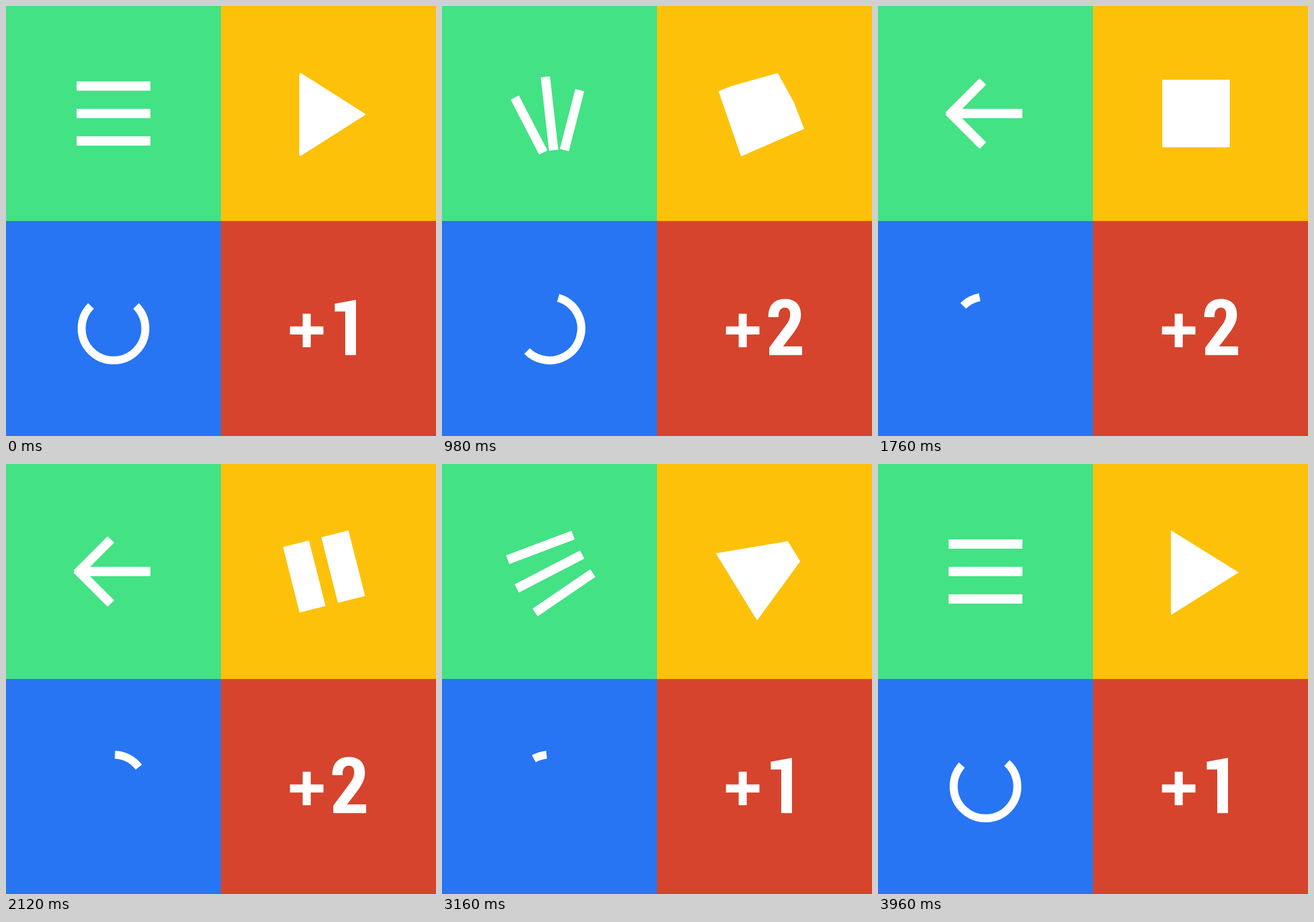
An HTML page with a canvas that plays this animation: 720x720 px, repeating every 3.98 s.

```html
<!DOCTYPE html>
<html lang="en">
<head>
<meta charset="utf-8">
<title>Four morphing icons</title>
<style>
html, body { margin: 0; width: 100%; height: 100%; overflow: hidden; }
canvas { display: block; width: 100vmin; height: 100vmin; }
</style>
</head>
<body>
<canvas id="stage" width="720" height="720"></canvas>
<script>
const ctx = document.getElementById('stage').getContext('2d');
const LOOP = 3980, TICK = 20, FPS = 30;
const GREEN = '#43e284', YELLOW = '#fdc109', BLUE = '#2775f3', RED = '#d6442d';
const rad = deg => deg * Math.PI / 180;
const clamp = x => Math.min(1, Math.max(0, x));
const mix = (a, b, p) => a + (b - a) * p;

// cubic-bezier(x1, 0, x2, 1)
function bezier(x1, x2, x) {
  if (x <= 0) return 0;
  if (x >= 1) return 1;
  let lo = 0, hi = 1;
  for (let i = 0; i < 24; i++) {
    const s = (lo + hi) / 2, r = 1 - s;
    if (3 * x1 * s * r * r + 3 * x2 * s * s * r + s ** 3 < x) lo = s; else hi = s;
  }
  return lo * lo * (3 - 2 * lo);
}
const turn = (k, start) => bezier(0.4, 0, (k - start) / 34);
const snap = (k, start) => bezier(0.333, 0, (k - start) / 24);
const spin = (k, start) => bezier(0.43, 0.1, (k - start) / 20);

// Runs draw with the origin at x, y, turned by deg
function at(x, y, deg, draw) {
  ctx.save();
  ctx.translate(x, y);
  ctx.rotate(rad(deg));
  draw();
  ctx.restore();
}

function polygon(points) {
  ctx.beginPath();
  points.forEach(([x, y]) => ctx.lineTo(x, y));
  ctx.closePath();
}

function morph(from, to, p) {
  polygon(from.map(([x, y], i) => [mix(x, to[i][0], p), mix(y, to[i][1], p)]));
  ctx.fill();
}

function bar(w, h) {
  ctx.fillRect(-w / 2, -h / 2, w, h);
}

function drawMenu(k) {
  const out = turn(k, 20), back = turn(k, 78.6), arrow = out - back;
  at(180, 180, 180 * (out + back), () => {
    bar(123.5, 15.5);
    for (const side of [-1, 1]) {
      at(33 * arrow, side * (46 - 21 * arrow), -side * 45 * arrow,
        () => bar(123.5 - 42.5 * arrow, 15.5));
    }
  });
}

const TRIANGLE = [[70.5, 1.5], [-39, 71], [-41.5, 70], [-41.5, 0], [-41.5, -66], [-39, -68]];
const DIAMOND = [[80, 0], [0, 80], [-20, 60], [-80, 0], [-40, -40], [0, -80]];
const SQUARE = [[-56.5, -56.5], [56.5, -56.5], [56.5, 56.5], [-56.5, 56.5]];
const PLAY = [[-42, -69], [71.5, 1.5], [71.5, 1.5], [-42, 73]];

function drawPlayer(k) {
  const stop = snap(k, 17.8), pause = snap(k, 52.8), play = snap(k, 87.5);
  const turned = play ? play : pause;
  const angle = pause ? 90 * (turned - 1) : 135 * stop;
  at(532.5, 180, angle, () => {
    if (!pause) return morph(TRIANGLE, DIAMOND, stop);
    morph(SQUARE, PLAY, play);
    const gap = play ? clamp(1 - play / 0.6) : clamp((pause - 0.4) / 0.6);
    if (!gap) return;
    if (play) ctx.rotate(Math.PI / 2);
    ctx.fillStyle = YELLOW;
    ctx.fillRect(-1 - 14.5 * gap, -100, 29 * gap, 200);
  });
}

function drawSpinner(k) {
  const c = k % 40, drift = 2.65 * c;
  const tail = 45 + drift + 254 * spin(c, 0);
  const head = 315 + drift + 254 * spin(c, 20);
  ctx.lineWidth = 13.4;
  ctx.beginPath();
  ctx.arc(180, 540, 53.3, rad(tail - 90), rad(head - 90));
  ctx.stroke();
}

const ONE = new Path2D('M550.5 498.5L586 492V584.5H568V511.5H550.5Z');
const TWO = new Path2D('M546.5 521C546 502 556 490.5 574 490.5C592 490.5 601 501 601 517' +
  'C601 528 596 537 588 548L571 570H603V584.5H548V572L574 537C581 528 583 523 583 516' +
  'C583 509 580 505 574 505C567 505 563 511 563.5 521Z');

function drawDigit(digit, area, dx) {
  ctx.save();
  polygon(area);
  ctx.clip();
  ctx.translate(dx, 0);
  ctx.fill(digit);
  ctx.restore();
}

function drawCounter(k) {
  const up = snap(k, 3.5), down = snap(k, 66.1);
  at(503.5, 543.3, 90 * (up - down), () => {
    bar(56, 13.5);
    bar(13.5, 56);
  });
  if (!up) return ctx.fill(ONE);

  // A diagonal edge sweeps across: new digit before it, old digit behind it
  const rest = (1 - (down || up)) ** 0.6;
  const edge = 830 - 155 * rest;
  const before = [[360, 360], [edge, 360], [360, edge]];
  const behind = [[edge, 360], [900, 360], [900, 900], [360, 900], [360, edge]];
  const [fresh, old, side] = down ? [ONE, TWO, 1] : [TWO, ONE, -1];
  drawDigit(fresh, before, side * 22 * rest);
  if (rest) drawDigit(old, behind, 0);
}

function frame(now) {
  const t = Math.floor(now % LOOP / TICK) * TICK;
  const k = Math.floor((t + TICK - 0.1) * FPS / 1000);
  [GREEN, YELLOW, BLUE, RED].forEach((colour, i) => {
    ctx.fillStyle = colour;
    ctx.fillRect(i % 2 * 360, (i >> 1) * 360, 360, 360);
  });
  ctx.fillStyle = ctx.strokeStyle = '#fff';
  drawMenu(k);
  drawPlayer(k);
  drawSpinner(k);
  drawCounter(k);
}

let begin;
function loop(now) {
  begin ??= now;
  frame(now - begin);
  requestAnimationFrame(loop);
}
requestAnimationFrame(loop);
</script>
</body>
</html>
```
